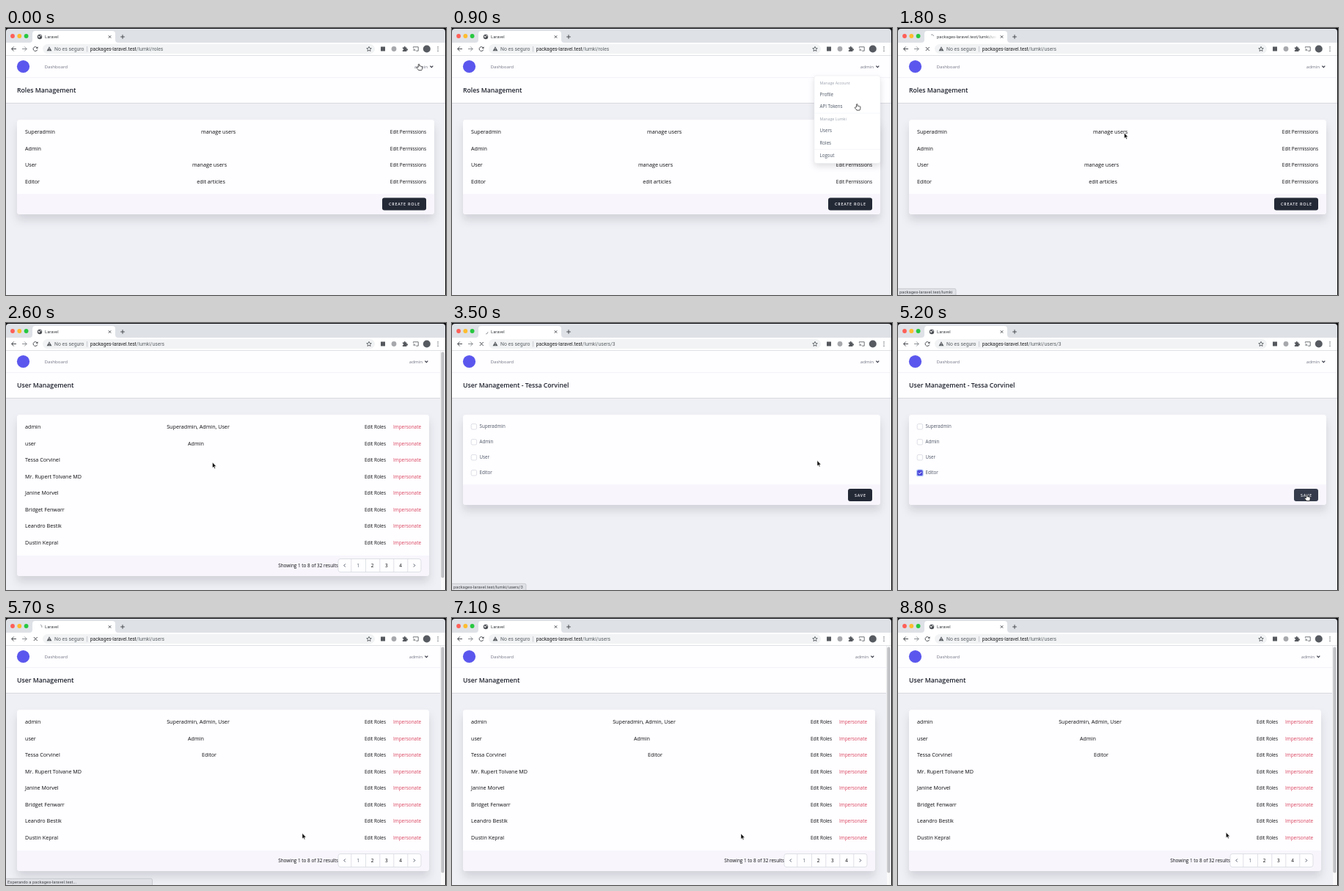
An HTML page for the animation above (9000 ms loop, 600 by 364 pixels).

```html
<!DOCTYPE html>
<html lang="en">
<head>
<meta charset="utf-8">
<title>Roles and users</title>
<style>
  html, body { margin: 0; width: 100%; height: 100%; overflow: hidden; background: #0b0b0d; }
  svg { display: block; width: 600px; height: 364px; }
  text { font: 7.2px "Open Sans", "Noto Sans", sans-serif; fill: #0c0d10; }
  .ui { font: 6.7px Roboto, Arial, sans-serif; fill: #202124; }
  .tab { font-size: 5.85px; }
  .dim { fill: #5f6368; }
  .sm { font-size: 6.4px; }
  .nav { font-size: 6.15px; fill: #717684; }
  .head { font-size: 8.7px; font-weight: 600; fill: #1c202b; }
  .red { fill: #d9405c; }
  .label { font-size: 6.2px; fill: #4b5563; }
  .hint { font-size: 5.3px; fill: #9ca3af; }
  .btn { font-size: 5.4px; font-weight: 600; letter-spacing: .8px; fill: #f4f5f8; }
  .mid { text-anchor: middle; }
  .end { text-anchor: end; }
  .card { filter: drop-shadow(0 8px 6px rgba(20, 22, 40, .13)); }
  .menu { filter: drop-shadow(0 4px 4px rgba(0, 0, 0, .12)); }
  .line { fill: none; stroke: #4b4e53; stroke-width: 1; }
</style>
</head>
<body>
<svg viewBox="0 0 600 364">
  <defs>
    <linearGradient id="fade" gradientUnits="userSpaceOnUse" x1="120" x2="135" y1="0" y2="0">
      <stop stop-color="#3c4043"/><stop offset="1" stop-color="#3c4043" stop-opacity="0"/>
    </linearGradient>
  </defs>

  <path d="M0 364V5Q0 1 4 1H595Q599 1 599 5V364Z" fill="#dee1e6"/>
  <rect y="38" width="599" height="326" fill="#eff0f5"/>
  <g id="pages"></g>

  <path d="M32 20Q36 20 36 16V8Q36 4 40 4H145Q149 4 149 8V16Q149 20 153 20Z" fill="#fff"/>
  <rect y="20" width="599" height="17.5" fill="#fff"/>
  <rect y="37.3" width="599" height=".7" fill="#d9dbdf"/>
  <rect x="50" y="22" width="453" height="13" rx="6.5" fill="#f1f3f4"/>
  <circle cx="9" cy="11" r="2.9" fill="#ff5f57"/>
  <circle cx="18.3" cy="11" r="2.9" fill="#febc2e"/>
  <circle cx="27.6" cy="11" r="2.9" fill="#28c840"/>
  <path class="line" d="M139.8 10.3l3.4 3.4m0-3.4l-3.4 3.4M156.2 12h5.6m-2.8-2.8v5.6"/>
  <path class="line" d="M14 28.5H7.6m3-3l-3 3 3 3"/>
  <path class="line" style="stroke:#8c8f94" d="M22 28.5h6.2m-3-3l3 3-3 3"/>

  <g id="idle">
    <circle cx="46" cy="12" r="3.2" fill="#4b4e53"/>
    <path d="M43.8 10.5l2 .5.3 1.4-1.3 1.2zm3-1l1.6 1-.5 1.1-1.2-.5z" fill="#fff"/>
    <path class="line" d="M42.6 27.2a2.9 2.9 0 1 0 .2 2.2"/>
    <path d="M43.5 25.2v2.8h-2.8z" fill="#4b4e53"/>
  </g>
  <g id="busy">
    <path id="spin" class="line" style="stroke:#8a8d93;stroke-width:.8" d="M46 9a3 3 0 0 1 3 3"/>
    <path class="line" d="M37.8 26l5 5m0-5l-5 5"/>
  </g>
  <text id="tab" class="ui tab" x="53" y="14.1" style="fill:url(#fade)"></text>

  <path d="M59 25.3l3.4 6h-6.8z" fill="#55585d"/>
  <path d="M59 27.3v2m0 .6v.8" stroke="#fff" stroke-width=".7"/>
  <text class="ui dim" x="66" y="31" style="font-size:6.9px">No es seguro</text>
  <rect x="110.3" y="25" width=".7" height="7.5" fill="#b8bbc0"/>
  <text class="ui" x="114.8" y="31">packages-laravel.test<tspan id="path" class="dim"></tspan></text>
  <path class="line" style="stroke-width:.8" d="M495 25.4l.95 2.1 2.3.25-1.7 1.5.5 2.25-2.05-1.15-2.05 1.15.5-2.25-1.7-1.5 2.3-.25z"/>
  <rect x="511" y="25.5" width="6" height="6" fill="#55585d"/>
  <circle cx="529" cy="28.5" r="3.4" fill="#a6a8ac"/>
  <path d="M540.8 26.6h1.9a1.1 1.1 0 1 1 2 0h1.7v1.8a1.1 1.1 0 1 1 0 2v1.6h-5.6v-1.8a1 1 0 1 0 0-1.9z" fill="#55585d"/>
  <path class="line" style="stroke-width:.8" d="M555.4 27v-1.2h6.8v5.4h-3M555.4 28.6a2.6 2.6 0 0 1 2.6 2.6m-2.6-1a1 1 0 0 1 1 1"/>
  <circle cx="573.8" cy="28.5" r="5" fill="#575b61"/>
  <path d="M589 26h.01m-.01 2.6h.01m-.01 2.6h.01" stroke="#4b4e53" stroke-width="1.4" stroke-linecap="round"/>

  <g id="menu"></g>
  <g id="status">
    <path id="bubble" fill="#dfe1e6" stroke="#b4b7bd" stroke-width=".6"/>
    <text id="link" class="ui" x="2" y="362" style="font-size:5.9px;fill:#45484d"></text>
  </g>
  <path id="arrow" d="M0 0V7.4L1.7 5.9 2.8 8.4 4 7.9 2.9 5.5H5.2Z" fill="#0a0a0a" stroke="#fff" stroke-width=".5"/>
  <path id="hand" d="M-.8 4.4V.6Q0-.5.8.6V2.9Q1.7 2.3 2.2 3.1 3.1 2.6 3.5 3.4 4.5 3 4.6 4V6.1Q4.4 7.5 3.7 8.6H-.3Q-1.6 6.9-3 5.2-2.6 3.9-1.6 4.5Z" fill="#fff" stroke="#1b1b1d" stroke-width=".75" stroke-linejoin="round"/>
</svg>

<script>
const LOOP = 9000, STEP = 100;
const $ = id => document.getElementById(id);

const text = (x, y, s, cls = '') => `<text x="${x}" y="${y}" class="${cls}">${s}</text>`;
const rect = (x, y, w, h, fill, extra = '') =>
  `<rect x="${x}" y="${y}" width="${w}" height="${h}" fill="${fill}" ${extra}/>`;
const chevron = (x, y, dir, color = '#4b5563') =>
  `<path d="M${x - dir} ${y - 2}l${2 * dir} 2l${-2 * dir} 2" fill="none" stroke="${color}"/>`;

const card = (w, bottom) => `<g class="card">${rect(15, 125, w, bottom - 125, '#fefdff', 'rx="4"')}</g>
  <path d="M15 ${bottom - 28}h${w}v24q0 4 -4 4H19q-4 0 -4 -4z" fill="#f8f6fc"/>`;

const button = (id, x, y, w, label) =>
  rect(x, y, w, 17, '#242936', `id="${id}" rx="3"`) + text(x + w / 2 + .4, y + 10.5, label, 'btn mid');

function page(id, title, width, body) {
  const dx = width - 599;
  return `<g id="${id}">
    ${rect(0, 38, width, 64, '#fefdff')}
    ${rect(0, 67.4, width, .7, '#eeeef4')}
    ${rect(0, 102, width, .9, '#d6d8df')}
    <circle cx="23.5" cy="52.5" r="8.6" fill="#5b57ee"/>
    ${text(52.5, 55, 'Dashboard', 'nav')}
    ${text(556.8 + dx, 55, 'admin', 'nav')}
    <path d="M${578.3 + dx} 51.7l2 2 2-2" fill="none" stroke="#363a45" stroke-width="1.2"/>
    ${text(15, 88.3, title, 'head')}${body}</g>`;
}

const rowY = i => 144 + 22.5 * i;

function rolesPage() {
  const roles = [['Superadmin', 'manage users', 289.7], ['Admin', '', 0],
    ['User', 'manage users', 277.5], ['Editor', 'edit articles', 279.5]];
  const rows = roles.map(([name, grant, x], i) =>
    text(26, rowY(i), name) + text(x, rowY(i), grant, 'mid') +
    text(573, rowY(i), 'Edit Permissions', 'sm end')).join('');
  return page('roles', 'Roles Management', 599,
    card(569, 254) + rows + button('create', 513, 231.5, 60, 'CREATE ROLE'));
}

function usersPage() {
  const names = ['admin', 'user', 'Tessa Corvinel', 'Mr. Rupert Tolvane MD',
    'Janine Morvel', 'Bridget Fenwarr', 'Leandro Bestik', 'Dustin Kepral'];
  const rows = names.map((name, i) =>
    text(26, rowY(i), name) + text(518, rowY(i), 'Edit Roles', 'sm end') +
    text(566, rowY(i), 'Impersonate', 'sm red end')).join('');
  const grants = text(262, rowY(0), 'Superadmin, Admin, User', 'mid') +
    text(259, rowY(1), 'Admin', 'mid') +
    `<g id="granted">${text(277, rowY(2), 'Editor', 'mid')}</g>`;
  const pager = text(453, 332.8, 'Showing 1 to 8 of 32 results', 'sm end') +
    rect(453, 321.5, 113, 18, '#fefdff', 'rx="3" stroke="#d3d6de" stroke-width=".7"') +
    [470.5, 490, 509.5, 528.5, 547.5].map(x => rect(x, 321.5, .7, 18, '#d3d6de')).join('') +
    [1, 2, 3, 4].map(n => text(461 + 19.3 * n, 332.9, n, n == 1 ? 'label mid' : 'sm mid')).join('') +
    chevron(461.8, 330.5, -1) + chevron(556.8, 330.5, 1);
  const scroll = rect(592, 38, 7, 326, '#fafafb') + rect(592, 38, .5, 326, '#e4e5e9') +
    rect(593.3, 39.5, 4.4, 308, '#c2c3c6', 'rx="2.2"');
  return page('users', 'User Management', 592, card(562, 345) + rows + grants + pager + scroll);
}

function editPage() {
  const boxes = ['Superadmin', 'Admin', 'User', 'Editor'].map((name, i) =>
    rect(26.2, 137.6 + 21 * i, 7.4, 7.4, '#fff', 'rx="1.8" stroke="#cfd3dc" stroke-width=".7"') +
    text(37.5, 143.3 + 21 * i, name, 'label')).join('');
  const check = `<g id="check">${rect(25, 199.5, 9.8, 9.8, '#b5cdf8', 'rx="2.6"')}
    ${rect(26.2, 200.6, 7.4, 7.4, '#4f4bdc', 'rx="1.6"')}
    <path d="M28 204.4l1.4 1.4 2.6-2.8" fill="none" stroke="#fff"/></g>`;
  return page('edit', 'User Management - Tessa Corvinel', 599,
    card(569, 248) + boxes + check + button('save', 540, 226, 33, 'SAVE'));
}

function menuBody() {
  const items = [['Manage Account', 77, 'hint'], ['Profile', 92.5], ['API Tokens', 109.4],
    ['Manage Lumki', 126, 'hint'], ['Users', 142], ['Roles', 158.9], ['Logout', 176.2]];
  return `<g class="menu">${rect(494, 65, 90, 119.5, '#fff', 'rx="3" stroke="#e7e8ed" stroke-width=".5"')}</g>` +
    rect(494.3, 131.2, 89.4, 16.9, '#f3f4f6', 'id="hover"') +
    rect(494, 115.8, 90, .5, '#eceef2') + rect(494, 165.2, 90, .5, '#eceef2') +
    items.map(([s, y, cls = 'label']) => text(501.5, y, s, cls)).join('');
}

$('pages').innerHTML = rolesPage() + usersPage() + editPage();
$('menu').innerHTML = menuBody();

// Pointer stops: time, x, y
const stops = [
  [0, 563, 49], [100, 565, 50], [300, 565, 50], [800, 556, 92], [1200, 541, 138], [1400, 541, 138],
  [1800, 308.5, 143], [2300, 97, 142], [2600, 281.5, 190], [2900, 500, 245], [3100, 502, 185],
  [3300, 502, 185], [3500, 498, 187.5], [4100, 29.5, 202], [4400, 29.5, 202], [4900, 545, 242],
  [5100, 557.5, 234], [5400, 557.5, 234], [5700, 404, 293.5], [6100, 393, 294], [7000, 393, 294],
  [7300, 396, 294], [7800, 396, 294], [8100, 438, 303], [8200, 438, 303], [8500, 447.3, 292.3]
];

function pointerAt(t) {
  const i = stops.findIndex(s => s[0] > t);
  if (i < 0) return stops[stops.length - 1].slice(1);
  const [t0, x0, y0] = stops[i - 1], [t1, x1, y1] = stops[i];
  const k = (t - t0) / (t1 - t0);
  return [x0 + (x1 - x0) * k, y0 + (y1 - y0) * k];
}

const within = (t, ...spans) => spans.some(([a, b]) => t >= a && t < b);
const show = (id, on) => $(id).style.display = on ? '' : 'none';

function statusAt(t) {
  const host = 'packages-laravel.test';
  if (within(t, [1400, 2300])) return [host + '/lumki', 79];
  if (within(t, [3300, 3900])) return [host + '/lumki/users/3', 101];
  if (within(t, [5500, 6100])) return [`Esperando a ${host}...`, 199.5];
  return null;
}

function draw(t) {
  const now = t < 2100 ? 'roles' : within(t, [3400, 5600]) ? 'edit' : 'users';
  for (const id of ['roles', 'users', 'edit']) show(id, id == now);
  show('granted', t >= 5600);
  show('check', t >= 4300);
  $('save').setAttribute('fill', within(t, [5000, 5600]) ? '#363c4b' : '#242936');

  const busy = within(t, [1500, 2300], [3300, 3900], [5400, 6100]);
  show('busy', busy);
  show('idle', !busy);
  $('spin').setAttribute('transform', `rotate(${-90 - (t % 1000) * .36} 46 12)`);
  $('tab').textContent = within(t, [1500, 2100]) ? 'packages-laravel.test/lumki/users' : 'Laravel';
  $('path').textContent = '/lumki/' +
    (t < 1500 ? 'roles' : within(t, [3300, 5500]) ? 'users/3' : 'users');

  show('menu', within(t, [300, 1500]));
  $('menu').style.opacity = t < 400 || t >= 1400 ? .5 : 1;
  show('hover', t >= 1200);

  const status = statusAt(t);
  show('status', status);
  if (status) {
    $('link').textContent = status[0];
    $('bubble').setAttribute('d', `M-1 355.3H${status[1] - 2}q2 0 2 2V365H-1Z`);
  }

  const hand = within(t, [0, 1500], [3000, 3400], [4000, 4600], [4900, 5500]);
  show('hand', hand);
  show('arrow', !hand);
  $(hand ? 'hand' : 'arrow').setAttribute('transform', `translate(${pointerAt(t)})`);
}

const start = performance.now();
function tick() {
  const t = (performance.now() - start) % LOOP;
  draw(Math.floor(t / STEP) * STEP);
  requestAnimationFrame(tick);
}
tick();
</script>
</body>
</html>
```
